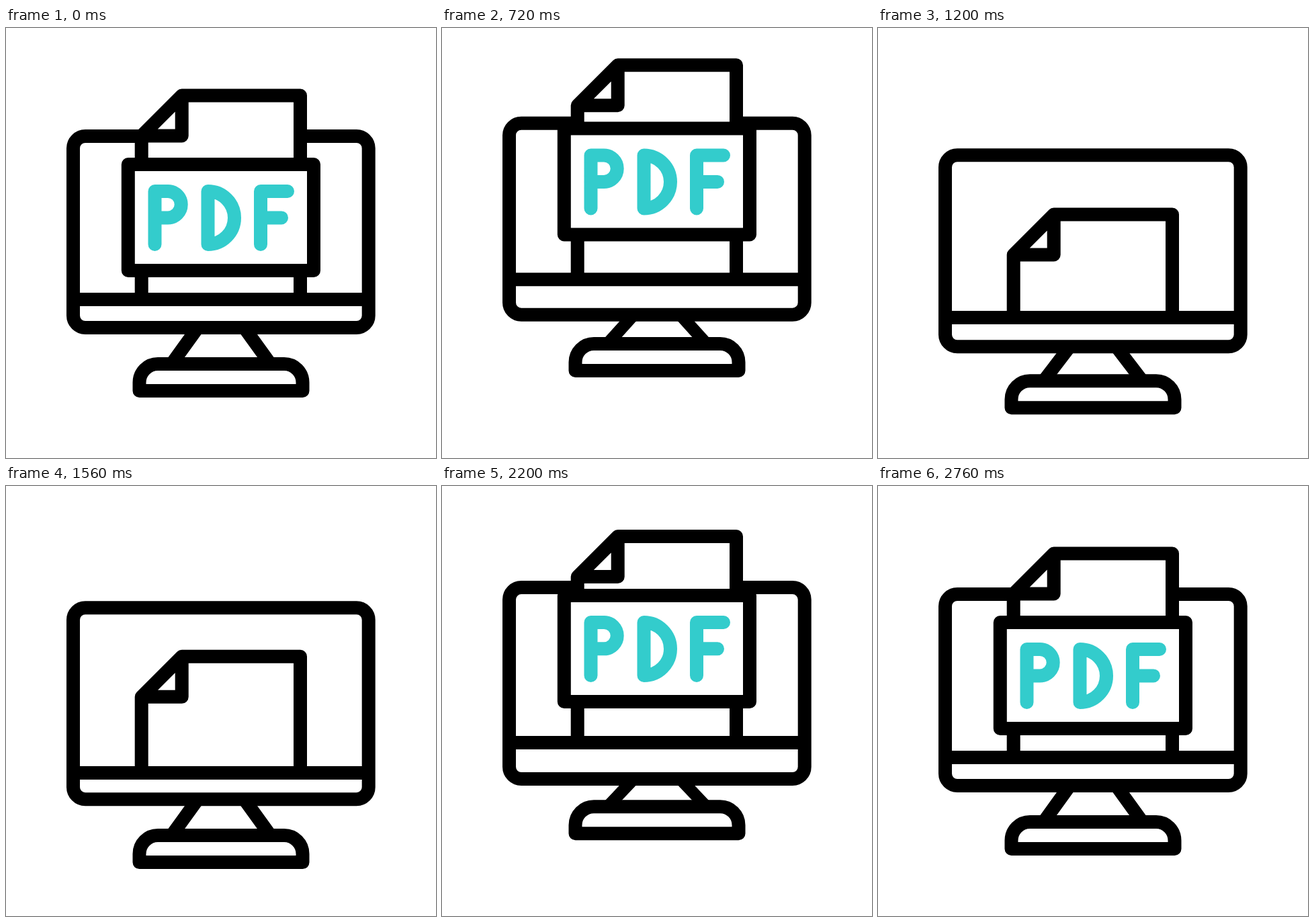
These frames come from a looping animation (640 by 640 pixels, 3 s). An HTML page without scripts:

```html
<!DOCTYPE html>
<html lang="en">
<head>
<meta charset="utf-8">
<title>PDF on a computer</title>
<style>
  /* Vertical offset of each part from its rest position */
  @property --monitor { syntax: "<number>"; inherits: true; initial-value: 0; }
  @property --base    { syntax: "<number>"; inherits: true; initial-value: 0; }
  @property --bar     { syntax: "<number>"; inherits: true; initial-value: 0; }
  @property --paper   { syntax: "<number>"; inherits: true; initial-value: 0; }
  @property --label   { syntax: "<number>"; inherits: true; initial-value: 0; }

  html, body { margin: 0; width: 100%; height: 100%; overflow: hidden; background: #fff; }

  svg {
    display: block; width: 100%; height: 100%;
    fill: none; stroke: #000; stroke-width: 20; stroke-linejoin: round;
    animation: 3s cubic-bezier(.333, 0, .667, 1) infinite;
    animation-name: monitor, base, bar, paper, label;
  }

  .monitor { transform: translateY(calc(var(--monitor) * 1px)); }
  .base    { transform: translateY(calc(var(--base) * 1px)); }
  .bar     { transform: translateY(calc(var(--bar) * 1px)); }
  .paper   { transform: translateY(calc((var(--paper) - var(--bar)) * 1px)); }
  .label   { transform: translateY(calc((var(--label) - var(--bar)) * 1px)); }
  /* The legs stretch between the monitor and the base */
  .legs {
    transform: translateY(calc((446 + var(--monitor)) * 1px))
               scaleY(calc((54 + var(--base) - var(--monitor)) / 54));
  }
  .sheet { fill: #fff; }
  .letters { stroke: #3cc; stroke-linecap: round; }

  @keyframes monitor {
    0%, 4%  { --monitor: 0; }
    19.67%  { --monitor: -28; }
    37.2%   { --monitor: 28; }
    45.83%  { --monitor: 29; }
    67%     { --monitor: -13.5; }
    86%, to { --monitor: 0; }
  }
  @keyframes base {
    0%, 4%     { --base: 0; }
    20%        { --base: -39; }
    37.2%      { --base: 25; }
    47.9%      { --base: 26; }
    67.83%     { --base: -27; }
    90.17%, to { --base: 0; }
  }
  @keyframes bar {
    0%, 4%     { --bar: 0; }
    20.67%     { --bar: -36; }
    37.9%      { --bar: 27; }
    48%        { --bar: 28; }
    69.17%     { --bar: -25; }
    88.33%, to { --bar: 0; }
  }
  @keyframes paper {
    0%, 4%     { --paper: 0; }
    21%        { --paper: -63; }
    39.2%      { --paper: 177; }
    47%        { --paper: 178; }
    70.33%     { --paper: -28; }
    86.67%, to { --paper: 0; }
  }
  @keyframes label {
    0%, 4%     { --label: 0; }
    21%        { --label: -77.7; }
    39.7%      { --label: 266; }
    46.67%     { --label: 267; }
    70.67%     { --label: -42; }
    91.33%, to { --label: 0; }
  }
</style>
</head>
<body>
<svg viewBox="0 0 640 640" role="img" aria-label="PDF document rising from a computer screen">
  <clipPath id="aboveBar"><rect x="0" y="-300" width="640" height="704"/></clipPath>

  <rect class="monitor" x="100" y="161" width="439.7" height="285" rx="18"/>
  <path class="legs" d="M285.5 0 246.5 54M354.5 0 393.5 54"/>
  <path class="base" d="M198.5 540V527.5A27.5 27.5 0 0 1 226 500H414A27.5 27.5 0 0 1 441.5 527.5V540Z"/>

  <g class="bar">
    <g clip-path="url(#aboveBar)">
      <path class="paper sheet" d="M201.7 800V160.5L261.7 100.5H438V800ZM261.7 100.5V160.5H201.7"/>
      <g class="label">
        <rect class="sheet" x="181.8" y="203" width="276.2" height="158"/>
        <path class="letters" d="M221.5 322V243H241a19.7 19.7 0 0 1 0 39.4H221.5
          M300.5 243V322a39.5 39.5 0 0 0 0-79Z
          M379 322V243H419M379 282.4H410"/>
      </g>
    </g>
    <path d="M100 404H540"/>
  </g>
</svg>
</body>
</html>
```
